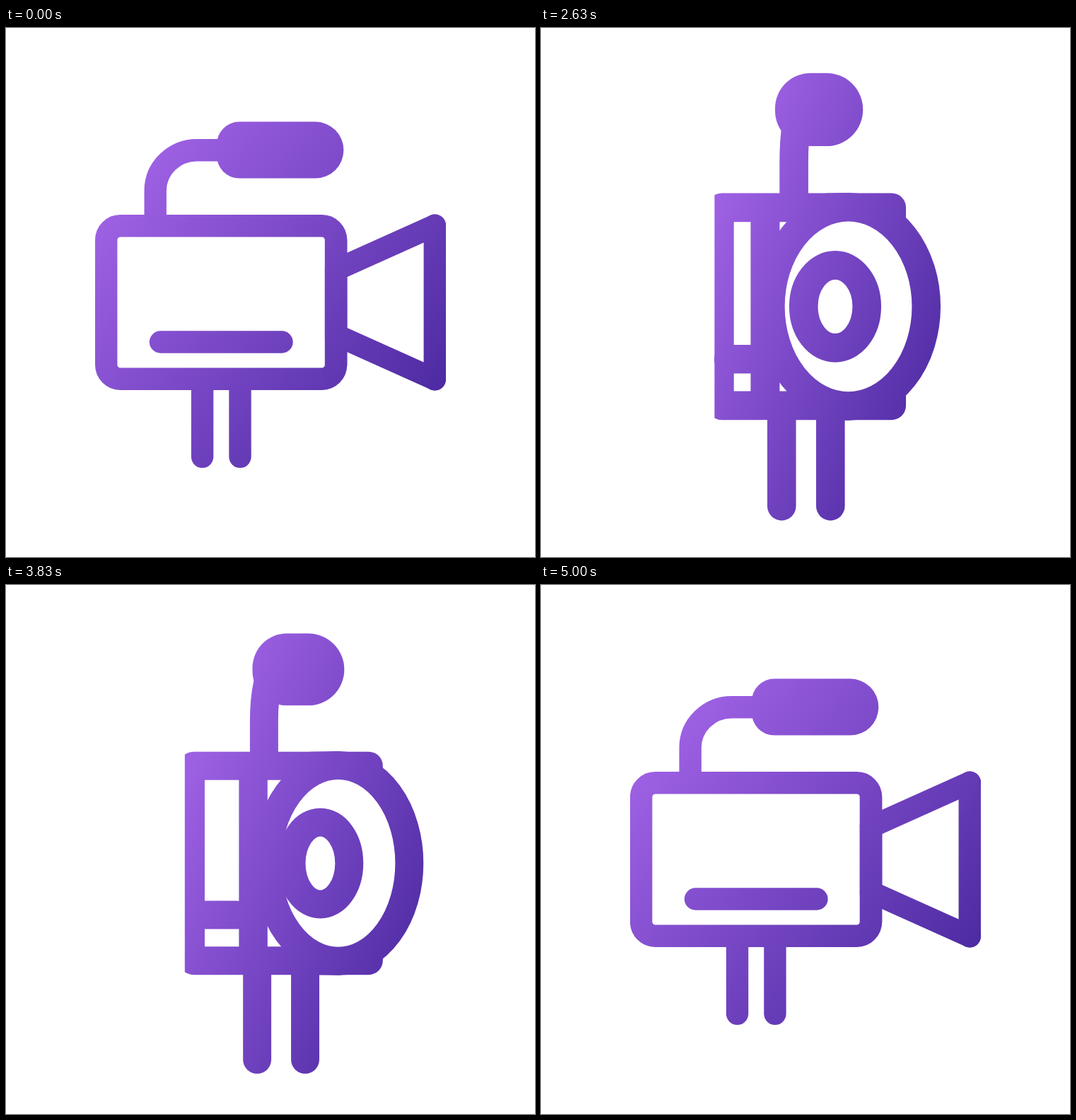
These frames come from a looping animation (748 by 748 pixels, 5030 ms). An HTML page with a canvas:

```html
<!DOCTYPE html>
<html lang="en">
<head>
<meta charset="utf-8">
<title>Turning camera</title>
<style>
  html, body { margin: 0; width: 100%; height: 100%; overflow: hidden; background: #fff; }
  canvas { display: block; width: 100vw; height: 100vh; }
</style>
</head>
<body>
<canvas id="stage" width="748" height="748"></canvas>
<script>
const ctx = document.getElementById('stage').getContext('2d');
const SIZE = 748, LOOP = 5030, HOLD = 2030, STEP = 30;
const LINE = 31.4, HALF = LINE / 2, HALF_H = 108.3;
const TOP = -255.4, LEG_END = 218.3;

const lerp = (a, b, k) => a + (b - a) * k;
const clamp = v => Math.min(1, Math.max(0, v));
const sine = u => (1 - Math.cos(Math.PI * u)) / 2;

// cubic-bezier(.26, 0, .4, 1)
function glide(x) {
  let lo = 0, hi = 1;
  for (let i = 0; i < 24; i++) {
    const s = (lo + hi) / 2, r = 1 - s;
    if (3 * r * r * s * .26 + 3 * r * s * s * .4 + s * s * s < x) lo = s; else hi = s;
  }
  return lo * lo * (3 - 2 * lo);
}

// 0 is the side view, 1 the front view; turning back mirrors the first turn in time
const turnAt = t => glide(clamp(Math.min(t - 2000, 4400 - t) / 1000));

// Extremes of the sideways swing and the easing that leads to each
const swings = [
  [2010, 0], [2220, 34, glide], [3180, -4.4, glide],
  [4010, 30, sine], [4530, -8, sine], [LOOP, 0, sine]
];

function swingAt(t) {
  const i = swings.findIndex(([time]) => t < time);
  if (i < 1) return 0;
  const [t0, a] = swings[i - 1], [t1, b, ease] = swings[i];
  return lerp(a, b, ease((t - t0) / (t1 - t0)));
}

// Runs across the unit box, which is stretched over the whole figure
const shade = ctx.createLinearGradient(.157, .123, .981, .772);
shade.addColorStop(0, '#9d60e3');
shade.addColorStop(1, '#4e2ba3');

function line(...pts) {
  ctx.beginPath();
  pts.forEach(([x, y]) => ctx.lineTo(x, y));
  ctx.stroke();
}

function ring(x, rx, ry) {
  ctx.beginPath();
  ctx.ellipse(x, 0, Math.max(rx, .01), ry, 0, 0, Math.PI * 2);
  ctx.globalCompositeOperation = 'destination-out';
  ctx.fill();
  ctx.globalCompositeOperation = 'source-over';
  ctx.stroke();
}

function pose(p) {
  const left = lerp(-232.3, -81.7, p), mid = lerp(92.6, -81.7, p), right = lerp(92.6, 81.7, p);
  const edge = left - Math.min(HALF, 3 + 16 * (1 - p));
  const lensX = lerp(232.3, .4, p), lensR = 100.7 * p;
  const reach = lensR + HALF;
  return { left, mid, right, edge, lensX, lensR,
    x0: Math.min(edge, lensX - reach), x1: lensX + reach };
}

function drawBody(p, { left, mid, right, edge, lensX, lensR }) {
  // Side panel
  ctx.save();
  ctx.beginPath();
  ctx.rect(edge, -200, 600, 400);
  ctx.clip();
  ctx.beginPath();
  ctx.roundRect(left, -HALF_H, Math.max(mid - left, .01), HALF_H * 2, 20 * (1 - p));
  ctx.stroke();
  ctx.restore();
  const barY = 56 + 1.8 * p;
  line([lerp(-155.5, -84, p), barY], [lerp(16, -84, p), barY]);

  // Front panel
  const h = HALF_H - 20 * Math.max(0, 1 - p / .3);
  line([mid, -h], [right, -h], [right, h], [mid, h], [mid, -h]);

  // Lens
  const faceX = (mid + right) / 2, neckY = lerp(46, HALF_H, clamp(p / .6));
  for (const side of [-1, 1]) line([faceX, side * neckY], [lensX, side * 108.8]);
  ring(lensX, lensR, 108.8);
  ring(lerp(92.6, 141 * (1 - p), clamp(p / .5)), 40.9 * p, lerp(50, 44.4, p));
}

function drawMicAndLegs(p) {
  // Microphone arm
  const a = lerp(-162.8, .7, p), b = lerp(-104, .7, p), c = .552;
  ctx.beginPath();
  ctx.moveTo(a, -HALF_H - 6);
  ctx.lineTo(a, -158);
  ctx.bezierCurveTo(a, -158 - 57 * c, lerp(b, a, c), -215.3, b, -215.3);
  ctx.lineTo(lerp(-60, .7, p), -215.3);
  ctx.stroke();

  const x0 = lerp(-76, -39.4, p), x1 = lerp(103.4, 41.6, p), r = lerp(32, 40, p);
  ctx.beginPath();
  ctx.roundRect(x0, TOP, x1 - x0, 80, [r, 40, 40, r]);
  ctx.fill();

  for (const x of [lerp(-96.4, -27.2, p), lerp(-43, 26.2, p)]) {
    line([x, HALF_H + 6], [x, LEG_END]);
  }
}

function draw(t) {
  const p = turnAt(t), swing = swingAt(t), scale = 1 + .346 * p, shape = pose(p);
  const midX = 374, midY = 368 + 20 * scale;
  ctx.setTransform(1, 0, 0, 1, 0, 0);
  ctx.globalCompositeOperation = 'source-over';
  ctx.clearRect(0, 0, SIZE, SIZE);
  ctx.lineWidth = LINE;
  ctx.lineCap = ctx.lineJoin = 'round';
  ctx.strokeStyle = ctx.fillStyle = '#000';

  const place = dx => ctx.setTransform(scale, 0, 0, scale, midX + dx * scale, midY);
  // Lens side and middle swing slightly apart while turned
  const depth = .05 * p;
  place(swing * (1 - depth));
  drawBody(p, shape);
  place(swing * (1 + depth));
  drawMicAndLegs(p);

  // Colour everything through the figure's bounding box
  place(swing);
  ctx.transform(shape.x1 - shape.x0, 0, 0, LEG_END + HALF - TOP, shape.x0, TOP);
  ctx.globalCompositeOperation = 'source-in';
  ctx.fillStyle = shade;
  ctx.fillRect(-2, -2, 5, 5);
  ctx.setTransform(1, 0, 0, 1, 0, 0);
  ctx.globalCompositeOperation = 'destination-over';
  ctx.fillStyle = '#fff';
  ctx.fillRect(0, 0, SIZE, SIZE);
}

const start = performance.now();
function frame() {
  const t = (performance.now() - start) % LOOP;
  draw(t < HOLD ? 0 : HOLD + Math.floor((t - HOLD) / STEP) * STEP);
  requestAnimationFrame(frame);
}
frame();
</script>
</body>
</html>
```
